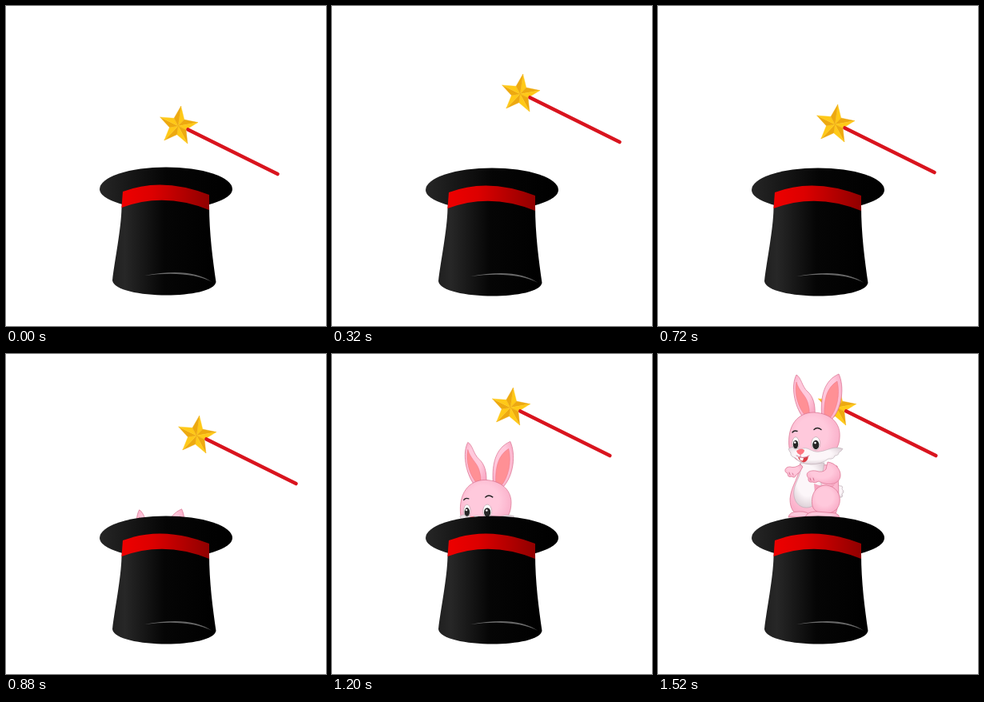
An HTML page for the animation above (1920 ms loop, 400 by 400 pixels).

```html
<!DOCTYPE html>
<html lang="en">
<head>
<meta charset="utf-8">
<title>Magic hat</title>
<style>
  html, body { margin: 0; height: 100%; overflow: hidden; background: #fff; }
  svg { display: block; width: 100vw; height: 100vh; }
  .fur { fill: url(#pink); stroke: #d9708f; stroke-width: .7; }
  .white { fill: url(#pale); stroke: #b9aab2; stroke-width: .6; }
  .inner { fill: #ff9095; stroke: #ee7386; stroke-width: .5; }
  .shade { fill: #f5a3be; }
  .line { fill: none; stroke: #c9607f; stroke-width: .8; stroke-linecap: round; }
  .brow { fill: none; stroke: #222; stroke-width: 1.4; stroke-linecap: round; }
</style>
</head>
<body>
<svg viewBox="0 0 400 400">
  <defs>
    <linearGradient id="felt">
      <stop offset="0" stop-color="#202020"/>
      <stop offset=".12" stop-color="#272727"/>
      <stop offset=".5" stop-color="#050505"/>
      <stop offset="1" stop-color="#000"/>
    </linearGradient>
    <linearGradient id="brim">
      <stop offset="0" stop-color="#262626"/>
      <stop offset=".5" stop-color="#050505"/>
      <stop offset="1" stop-color="#000"/>
    </linearGradient>
    <linearGradient id="ribbon">
      <stop offset="0" stop-color="#ee0000"/>
      <stop offset=".35" stop-color="#dc0000"/>
      <stop offset="1" stop-color="#900000"/>
    </linearGradient>
    <radialGradient id="pink" cx=".45" cy=".42" r=".62">
      <stop offset=".5" stop-color="#ffc9dc"/>
      <stop offset="1" stop-color="#f9abc6"/>
    </radialGradient>
    <radialGradient id="pale" cx=".45" cy=".4" r=".62">
      <stop offset=".55" stop-color="#fcf6f9"/>
      <stop offset="1" stop-color="#dccfd6"/>
    </radialGradient>
    <clipPath id="above"><path d="M0 0H400V228H0Z"/></clipPath>
  </defs>

  <g id="wand">
    <g id="star"></g>
    <path d="M227.500 154.500L339.500 210" stroke="#d9141e" stroke-width="4.600" stroke-linecap="round"/>
  </g>

  <g clip-path="url(#above)">
    <g id="rabbit">
      <path class="white" d="M222 165Q225 161 227 165Q232 164 230 169Q234 172 230 175Q232 180 227 179Q224 183 220 178Z"/>
      <path class="fur" d="M178 136C178 152 166 165 165 181C165 193 169 199 178 203L220 203C228 192 226 165 224 140Z"/>
      <path class="white" d="M178 136C181 150 172 158 170 170C168 184 177 193 187 192C198 191 205 178 204 160L208 136Z"/>
      <path class="shade" d="M195 162Q208 168 222 162L218 167Q204 169 196 174Z"/>
      <path class="fur" d="M163 204Q164 197 176 197Q187 196 193 204Z"/>
      <path class="fur" d="M193 190C190 174 199 164 210 164C222 165 229 175 227 186C225 196 216 201 204 199Q195 197 193 190Z"/>
      <path class="fur" d="M184 204Q186 197 198 197L222 199Q227 201 227 205Z"/>
      <path class="fur" d="M178 138Q171 143 165 141C158 141 157 148 162 149Q162 155 167 153Q171 156 173 151Q178 148 181 141Z"/>
      <path class="fur" d="M212 135C222 136 229 145 228 153C226 164 211 165 201 159Q196 162 193 160Q187 161 188 155C183 149 189 145 197 146Q206 149 210 144Z"/>
      <path class="line" d="M190 155L191 158M194 155L195 158M164 148L165 151M168 149L169 151"/>

      <path class="fur" d="M181 79C170 64 166 39 173 26C179 29 180 41 187 47C194 53 197 64 196 76Z"/>
      <path class="inner" d="M185 78C175 67 170 50 173 35C176 46 184 51 187 60Q190 69 189 77Z"/>
      <path class="fur" d="M204.500 76C203 52 208 33 226 25C233 40 231 68 216 83Z"/>
      <path class="inner" d="M208 77C207 57 211 42 224 34C228 50 224 70 214 81Z"/>
      <path class="fur" d="M164 117C161 90 174 73 195 73C216 74 229 87 227 105C226 122 211 136 192 137C177 137 166 130 164 117Z"/>
      <path class="white" d="M163 119C168 113 174 119 179 119C187 114 192 124 202 122C212 121 219 114 231 118.500Q229 122 226 123Q226 127 221 127Q220 132 213 131Q204 138 191 138Q177 137 172 130Q165 128 166 124Z"/>
      <g id="eyes"></g>
      <path class="brow" d="M168 98Q170 95 174 96.500M195 94.500Q199 90.500 204 94.500"/>
      <path d="M173 121Q178 117 183 120Q183 124 178 126Q174 125 173 121Z" fill="#ff7580"/>
      <path d="M175 129Q181 131 188 128Q187 135 182 135.500Q177 134 175 129Z" fill="#d83b43"/>
      <path d="M177 129.500L182 130L181 133.500L178 133Z" fill="#fff"/>
      <path class="line" d="M178 126V129M173 127Q181 132 189 127"/>
    </g>
  </g>

  <g id="hat">
    <path d="M117 230A83 27.500 0 0 1 283 230A83 25 0 0 1 117 230Z" fill="url(#brim)"/>
    <path d="M146 234L144.500 253C144 280 136 318 133 344C136 367.500 258 369 262.500 346C258.500 318 254 285 254 250V237Z" fill="url(#felt)"/>
    <path d="M146 233Q195 214 254 237V256Q198 233 144.500 253Z" fill="url(#ribbon)"/>
    <path d="M173 338Q230 327 257.500 346Q228 331 173 338Z" fill="#686868"/>
  </g>
</svg>
<script>
  const STEP = 80, LOOP = 1920, LAST = 19;
  // Wand offset at each step: one counterclockwise wave, a second one, then rest.
  const wave = [
    [0, 0], [8, 1], [16, 2], [23.5, 1], [20, -40], [-10, -68], [-42, -51],
    [-40, -24], [-19, -8], [6, -2], [23.5, -19], [23, -48], [15, -72], [7.8, -83]
  ];
  const byId = id => document.getElementById(id);
  const shift = (id, x, y) => byId(id).setAttribute('transform', `translate(${x} ${y})`);

  const center = [215.2, 149.9];
  const starPoint = i => {
    const r = i % 2 ? 11 : 25, a = (-82 + 36 * i) * Math.PI / 180;
    return [center[0] + r * Math.cos(a), center[1] + r * Math.sin(a)];
  };
  byId('star').innerHTML = Array.from({ length: 10 }, (_, i) => {
    const color = i % 2 ? '#eda910' : '#ffc917';
    return `<path d="M${center}L${starPoint(i)}L${starPoint(i + 1)}Z" fill="${color}" stroke="${color}" stroke-width=".4"/>`;
  }).join('');

  const eye = (x, y, r) => `
    <ellipse cx="${x}" cy="${y - 1.5}" rx="${r}" ry="${r * 0.5 + 5.6}" fill="#fff" stroke="#a08890" stroke-width=".5"/>
    <ellipse cx="${x}" cy="${y}" rx="${r * .76}" ry="${r * .4 + 3.6}" fill="#252525"/>
    <circle cx="${x - .8}" cy="${y - 2.4}" r="1.300" fill="#fff"/>`;
  byId('eyes').innerHTML = eye(172, 113, 4.2) + eye(197.3, 113.5, 5.4);

  function draw(now) {
    const step = Math.min(LAST, Math.floor(now % LOOP / STEP));
    const left = LAST - step;
    shift('wand', ...wave[Math.min(step, wave.length - 1)]);
    shift('rabbit', -0.8 * left, 21.1 * left);
    shift('hat', 0, step ? 0 : -1);
  }

  const start = performance.now();
  function tick() {
    draw(performance.now() - start);
    requestAnimationFrame(tick);
  }
  tick();
</script>
</body>
</html>
```
